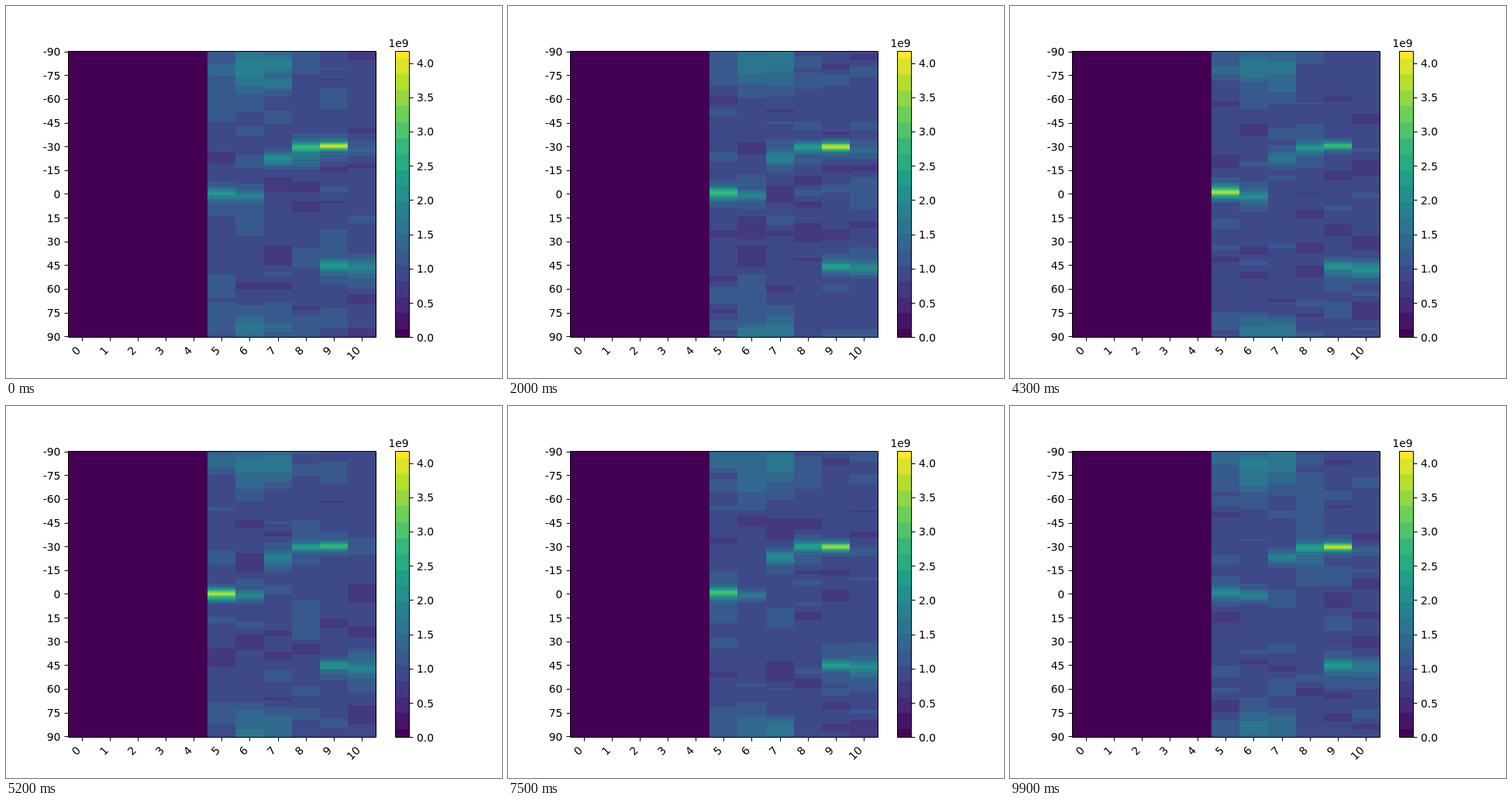
Animation of 640x480 px, one loop 10000 ms. Source, as an HTML page with a canvas:

```html
<!DOCTYPE html>
<html lang="en">
<head>
<meta charset="utf-8">
<title>Angle heatmap</title>
<style>
  html, body { margin: 0; width: 100%; height: 100%; overflow: hidden; background: #fff; }
  canvas, svg { position: absolute; left: 0; top: 0; display: block; }
  text { font: 13.89px "DejaVu Sans", sans-serif; fill: #000; }
  .line { stroke: #000; stroke-width: 1; fill: none; }
</style>
</head>
<body>
<canvas id="heat" width="640" height="480"></canvas>
<svg id="axes" width="640" height="480" viewBox="0 0 640 480"></svg>
<script>
const ctx = document.getElementById('heat').getContext('2d');
const svg = document.getElementById('axes');

const LEFT = 80, RIGHT = 476.8, TOP = 57.6, BOTTOM = 427.2;
const COLS = 11, ROWS = 181, FIRST = 5;
const COL_W = (RIGHT - LEFT) / COLS, ROW_H = (BOTTOM - TOP) / ROWS;
const UNIT = 88.4, VMAX = (BOTTOM - TOP) / UNIT;
const STEP = 100, STEPS = 100, LEVELS = 18;
const FLOOR = 0.93, RIPPLE = 0.2;

const VIRIDIS = ['440154', '482878', '3e4989', '31688e', '26828e',
                 '1f9e89', '35b779', '6ece58', 'b5de2b', 'fde725']
  .map(h => [0, 2, 4].map(i => parseInt(h.slice(i, i + 2), 16)));

function shade(level) {
  const p = level / LEVELS * (VIRIDIS.length - 1);
  const i = Math.min(Math.floor(p), VIRIDIS.length - 2);
  const rgb = VIRIDIS[i].map((c, k) => Math.round(c + (VIRIDIS[i + 1][k] - c) * (p - i)));
  return `rgb(${rgb})`;
}
const COLORS = Array.from({ length: LEVELS + 1 }, (_, i) => shade(i));

// Sway is how far the height swings over one loop
const PEAKS = [
  { col: 5, angle: -0.5, width: 4.5, height: 1.95, sway: -0.65 },
  { col: 6, angle: 1.5, width: 4.5, height: 1, sway: 0 },
  { col: 7, angle: -22.7, width: 5.5, height: 0.95, sway: 0.1 },
  { col: 8, angle: -29.4, width: 4.5, height: 1.5, sway: 0.15 },
  { col: 8, angle: -21, width: 6, height: 0.3, sway: 0 },
  { col: 9, angle: -29.7, width: 3.5, height: 2.55, sway: 0.5 },
  { col: 9, angle: 45.7, width: 5, height: 1.4, sway: 0 },
  { col: 10, angle: 46.7, width: 7, height: 0.95, sway: -0.1 },
  { col: 10, angle: -27, width: 4, height: 0.3, sway: 0 }
];

// Seeded random number from -1 to 1
function rand(a, b, c) {
  let h = Math.imul(a + 17, 374761393) ^ Math.imul(b + 31, 668265263) ^ Math.imul(c + 7, 1274126177);
  h = Math.imul(h ^ (h >>> 13), 1103515245);
  h = Math.imul(h ^ (h >>> 16), 2246822519);
  return ((h ^ (h >>> 15)) >>> 0) / 2147483648 - 1;
}

const bell = u => Math.exp(-u * u);
const spike = u => 1 / (1 + u * u) ** 2;

function noise(col, step, angle) {
  const p = (angle + 90) / 7 + rand(col, step, 99);
  const i = Math.floor(p), f = p - i, s = f * f * (3 - 2 * f);
  const a = rand(col, step, i), b = rand(col, step, i + 1);
  return RIPPLE * (a + (b - a) * s);
}

// Broad lobes at both ends of the angle range, strongest in columns 6 and 7
function lobes(col, angle, swing) {
  const top = (0.78 + 0.12 * swing) * bell((col - 6.4) / 1.4) * bell((angle + 81) / 16);
  const bottom = 0.62 * bell((col - 6.4) / 1.2) * bell((angle - 86) / 11);
  return top + bottom;
}

function peaksAt(step, swing) {
  return PEAKS.map((p, i) => ({
    col: p.col,
    width: p.width,
    angle: p.angle + 0.5 * rand(i, step, 201),
    height: (p.height + p.sway * swing) * (1 + 0.06 * rand(i, step, 202))
  }));
}

function drawHeat(step) {
  const swing = Math.cos(2 * Math.PI * step / STEPS);
  const peaks = peaksAt(step, swing);
  for (let col = FIRST; col < COLS; col++) {
    const x = Math.round(LEFT + col * COL_W);
    const w = Math.round(LEFT + (col + 1) * COL_W) - x;
    const mine = peaks.filter(p => p.col === col);
    for (let row = 0; row < ROWS; row++) {
      const angle = row - 90;
      let v = FLOOR + noise(col, step, angle) + lobes(col, angle, swing);
      for (const p of mine) v += p.height * spike((angle - p.angle) / p.width);
      const level = Math.round(Math.min(1, Math.max(0, v / VMAX)) * LEVELS);
      const y = Math.round(TOP + row * ROW_H);
      ctx.fillStyle = COLORS[level];
      ctx.fillRect(x, y, w, Math.round(TOP + (row + 1) * ROW_H) - y);
    }
  }
}

function add(tag, attrs, content = '') {
  const el = document.createElementNS('http://www.w3.org/2000/svg', tag);
  for (const name in attrs) el.setAttribute(name, attrs[name]);
  el.textContent = content;
  svg.appendChild(el);
}
const snap = v => Math.floor(v + 0.5) + 0.5;
const baseline = y => Math.floor(y + 6);
const line = d => add('path', { d, class: 'line' });

function drawAxes() {
  ctx.fillStyle = COLORS[0];
  ctx.fillRect(80, 58, 181, 369);

  // Colour bar
  for (let i = 0; i <= LEVELS; i++) {
    const edge = n => Math.round(BOTTOM - Math.min(1, Math.max(0, n / LEVELS)) * (BOTTOM - TOP));
    const y = edge(i + 0.5);
    ctx.fillStyle = COLORS[i];
    ctx.fillRect(502, y, 18, edge(i - 0.5) - y);
  }
  for (let v = 0; v <= 4; v += 0.5) {
    const y = BOTTOM - v * UNIT;
    line(`M520.5 ${snap(y)}h5`);
    add('text', { x: 530, y: baseline(y) }, v.toFixed(1));
  }
  add('text', { x: 519.7, y: 53, 'text-anchor': 'end' }, '1e9');

  for (let a = -90; a <= 90; a += 15) {
    const y = TOP + (a + 90.5) * ROW_H;
    line(`M80.5 ${snap(y)}h-5`);
    add('text', { x: 70.3, y: baseline(y), 'text-anchor': 'end' }, String(a));
  }
  for (let i = 0; i < COLS; i++) {
    const x = LEFT + (i + 0.5) * COL_W;
    line(`M${snap(x)} 427.5v5`);
    add('text', { transform: `translate(${Math.round(x - 1.2)} 445.3) rotate(-45)`, 'text-anchor': 'end' }, String(i));
  }
  line('M80.5 58.5H477.5V427.5H80.5Z');
  line('M502.5 58.5H520.5V427.5H502.5Z');
}

let shown = -1;
function tick() {
  const step = Math.floor(performance.now() / STEP) % STEPS;
  if (step !== shown) drawHeat(shown = step);
  requestAnimationFrame(tick);
}

drawAxes();
tick();
</script>
</body>
</html>
```
